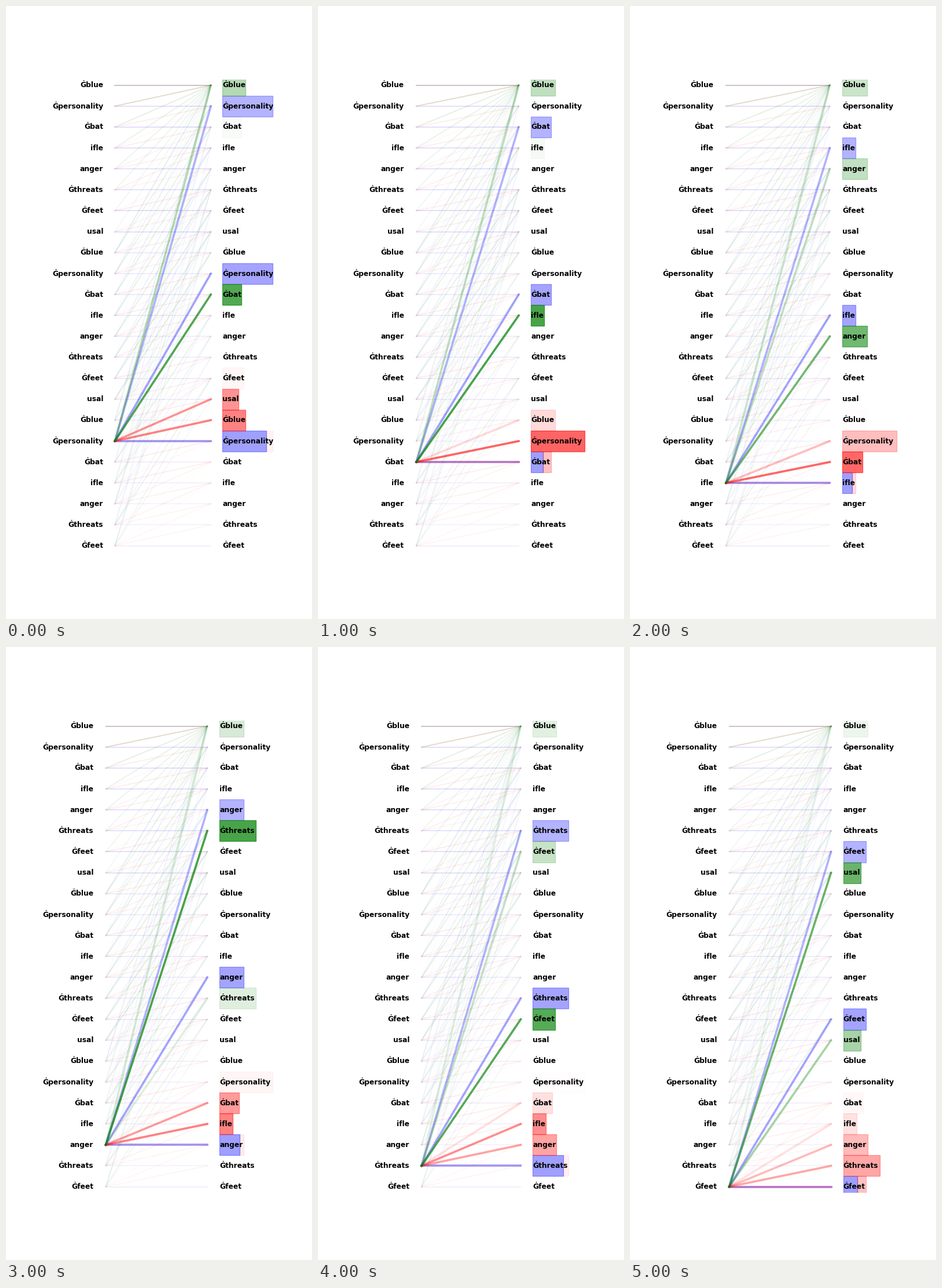
Recreate the animation shown at these times as a matplotlib script. Size 529 px wide and 1058 px high, loop 6 s.

```python
import math

import matplotlib.pyplot as plt
from matplotlib.animation import FuncAnimation
from matplotlib.patches import Rectangle

W, H = 529, 1058
TOP, STEP = 136.7, 36.13            # first row and row pitch
RIGHT = 460.6                       # right edge of the widest box
GAP, BOX = 0.121, 0.521             # label gap and widest box, in link spans
LEFT = [188.3, 170, 166, 172.5, 179, 171.5]

# each word with the share its follow-up link gives to the older copy
WORDS = {"Ġblue": 0.3, "Ġpersonality": 0.04, "Ġbat": 0.05, "ifle": 0.3,
         "anger": 0.85, "Ġthreats": 0.25, "Ġfeet": 0.63, "usal": 0.25}
NAMES = list(WORDS)
PERIOD = len(NAMES)
ROWS = 23
FIRST = 17                          # first highlighted row


def same_word(i):
    """Weights on the row itself and on earlier copies of its word."""
    copies = i // PERIOD + 1
    boost = (3 / copies) ** 0.85
    return {i - PERIOD * k: (0.375 - 0.019 * k * k) * boost
            for k in range(copies)}


def recent_rows(i):
    """Bell curve over the last few rows, widening towards the end."""
    phase = i % PERIOD
    center = 0.84 + 0.2 * ((phase - 2) % 4) + 0.05 * (phase - 1)
    spread = 0.65 + 0.65 * (i / (ROWS - 1)) ** 30
    bell = {i - k: math.exp(-((k - center) / spread) ** 2 / 2)
            for k in range(min(i, 4) + 1)}
    total = sum(bell.values())
    return {j: w / total for j, w in bell.items()}


def follow_up(i):
    """Weights on the first row and on what followed earlier copies."""
    phase = i % PERIOD
    if i < PERIOD:
        return {0: 1 - 0.08 * i}
    first = 0.34 - 0.045 * phase
    older = WORDS[NAMES[phase]] if i >= 2 * PERIOD else 0
    weights = {0: first, i - 7: (1 - first) * (1 - older)}
    if older:
        weights[i - 15] = (1 - first) * older
    return weights


HEADS = {"blue": same_word, "red": recent_rows, "green": follow_up}

fig = plt.figure(figsize=(6, 12), dpi=W / 6, facecolor="white")
ax = fig.add_axes([0.125, 0.11, 0.775, 0.77])


def row_y(i):
    return TOP + STEP * i


def draw_links(i, x0, x1, scale, width):
    for color, head in HEADS.items():
        for j, w in head(i).items():
            ax.plot([x0, x1], [row_y(i), row_y(j)], color=color,
                    alpha=w * scale, lw=width)


def draw_boxes(source, x, widths):
    marks = {}
    for color, head in HEADS.items():
        for j, w in head(source).items():
            marks.setdefault(j, []).append((color, w))
    for j, parts in marks.items():
        total = sum(w for _, w in parts)
        left = x
        for color, w in parts:
            part = widths[j] * w / total
            ax.add_patch(Rectangle((left, row_y(j) - STEP / 2), part, STEP,
                                   color=color, alpha=w, zorder=1))
            left += part


def draw(frame):
    ax.clear()
    ax.axis("off")
    ax.set_xlim(0.125 * W, 0.9 * W)
    ax.set_ylim(0.89 * H, 0.12 * H)

    x0 = LEFT[frame]
    span = (RIGHT - x0) / (1 + GAP + BOX)
    x1 = x0 + span
    label_x = x1 + GAP * span
    source = FIRST + frame

    font = dict(size=10, weight="bold", family="DejaVu Sans",
                va="center", zorder=5)
    widths = []
    for i in range(ROWS):
        word = NAMES[i % PERIOD]
        ax.text(x0 - GAP * span, row_y(i), word, ha="right", **font)
        label = ax.text(label_x, row_y(i), word, ha="left", **font)
        widths.append(label.get_window_extent().width)
    unit = BOX * span / max(widths)

    for i in range(ROWS):
        if i != source:
            draw_links(i, x0, x1, scale=0.12, width=1.5)
    draw_links(source, x0, x1, scale=1, width=3)
    draw_boxes(source, label_x, [w * unit for w in widths])
    return ()


anim = FuncAnimation(fig, draw, frames=len(LEFT), interval=1000,
                     init_func=lambda: (), repeat=True, repeat_delay=0)
plt.show()
```
